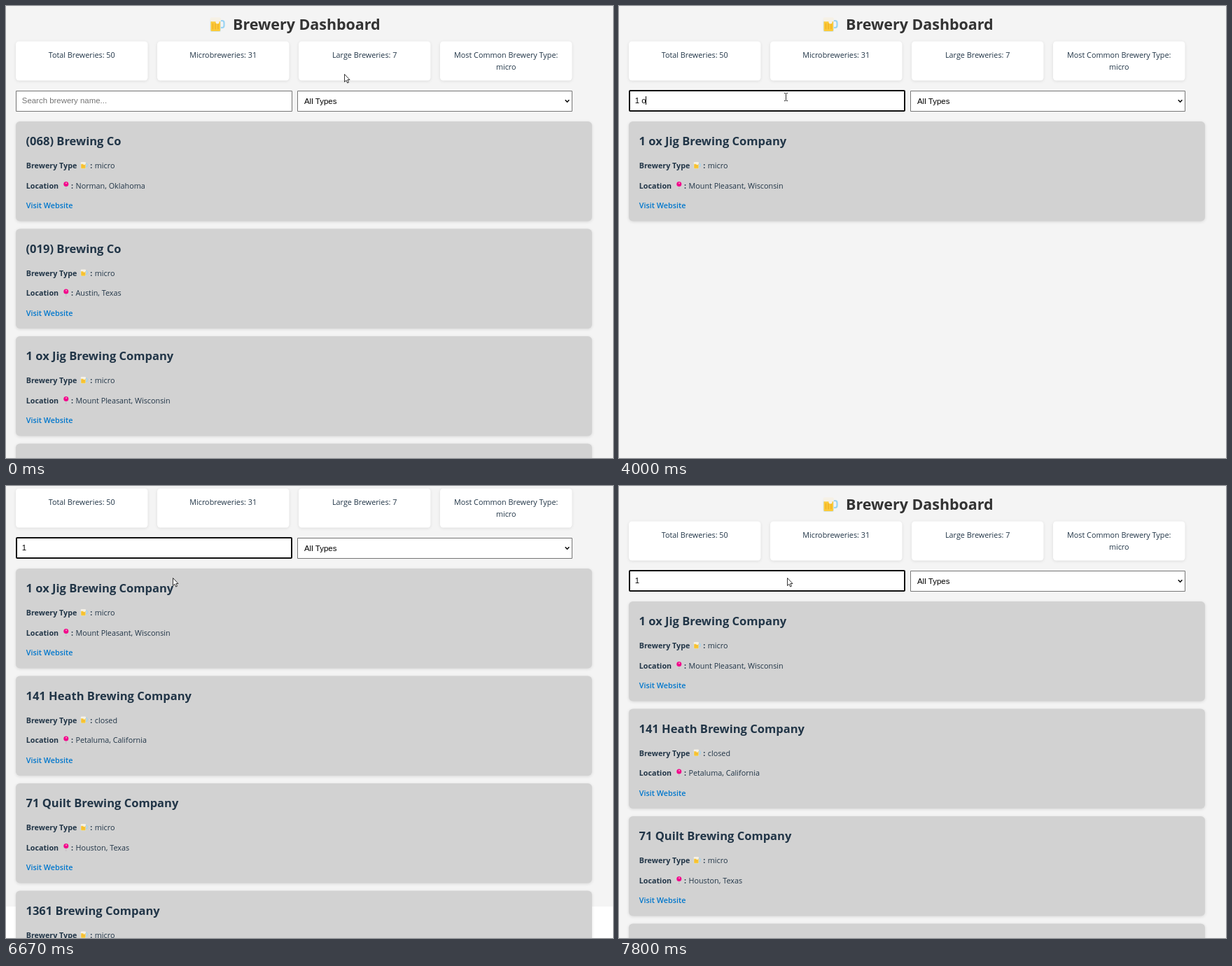
An HTML page with a canvas that plays this animation: 867x646 px, repeating every 8 s.

```html
<!DOCTYPE html>
<html lang="en">
<head>
<meta charset="utf-8">
<title>Brewery Dashboard</title>
<style>
html, body { margin: 0; width: 100%; height: 100%; overflow: hidden; background: #f4f4f4; }
canvas { display: block; }
</style>
</head>
<body>
<canvas id="stage" width="867" height="646"></canvas>
<script>
const ctx = document.getElementById('stage').getContext('2d');
const W = 867, H = 646, LOOP = 8000, TICK = 200 / 3;
const SANS = '"Open Sans", "Noto Sans", sans-serif';
const ARIAL = '11.43px "Liberation Sans", Arial, sans-serif';
const BODY = `10.8px ${SANS}`, BOLD = `bold 10.75px ${SANS}`;
const INK = '#213547';

const brewery = (name, type, place, site = true) => ({ name, type, place, site });
const breweries = [
  brewery('(068) Brewing Co', 'micro', 'Norman, Oklahoma'),
  brewery('(019) Brewing Co', 'micro', 'Austin, Texas'),
  brewery('1 ox Jig Brewing Company', 'micro', 'Mount Pleasant, Wisconsin'),
  brewery('10 Dapple Brewing Co', 'large', 'Bend, Oregon'),
  brewery('141 Heath Brewing Company', 'closed', 'Petaluma, California'),
  brewery('71 Quilt Brewing Company', 'micro', 'Houston, Texas'),
  brewery('1361 Brewing Company', 'micro', 'Spotsylvania, Virginia', false)
];

// Timelines are counted in ticks of 1/15 s.
const typing = [[0, ''], [54, '1'], [58, '1 '], [59, '1 o'], [62, '1 ox'], [70, '1 o'], [72, '1 ']];
const blinks = [16, 24, 32, 40, 48, 73, 76, 83, 92, 100, 107, 116];
const pointer = [
  [0, 483, 97], [5, 302, 101], [8, 302, 101], [9, 288, 98], [13, 156, 140], [18, 156, 140],
  [21, 239, 130], [93, 239, 130], [94, 240, 130], [99, 240, 130], [100, 238, 131],
  [106, 238, 131], [107, 240, 131]
];
const scrolling = [
  [97, 0], [98, 5], [99, 22], [100, 47], [101, 71], [102, 95], [103, 111], [104, 118],
  [111, 118], [112, 113], [114, 75], [115, 44], [116, 13], [117, 0]
];

function track(keys, n) {
  const i = keys.findIndex(k => k[0] > n);
  if (i === 0) return keys[0].slice(1);
  if (i < 0) return keys[keys.length - 1].slice(1);
  const a = keys[i - 1], b = keys[i], u = (n - a[0]) / (b[0] - a[0]);
  return a.slice(1).map((v, j) => Math.round(v + (b[j + 1] - v) * u));
}

const typedAt = n => typing.filter(k => k[0] <= n).pop()[1];

function text(str, x, y, font, color = INK, align = 'left') {
  ctx.font = font;
  ctx.fillStyle = color;
  ctx.textAlign = align;
  ctx.fillText(str, x, Math.round(y));
}

function panel(x, y, w, h, r, color, shadow) {
  ctx.save();
  ctx.shadowColor = `rgba(0,0,0,${shadow})`;
  ctx.shadowBlur = 4.5;
  ctx.shadowOffsetY = 1;
  block(x, y, w, h, r, color);
  ctx.restore();
}

function block(x, y, w, h, r, color) {
  ctx.fillStyle = color;
  ctx.beginPath();
  ctx.roundRect(x, y, w, h, r);
  ctx.fill();
}

function trace(points) {
  ctx.beginPath();
  points.forEach(([x, y]) => ctx.lineTo(x, y));
}

function stroke(color, width) {
  ctx.strokeStyle = color;
  ctx.lineWidth = width;
  ctx.stroke();
}

// Beer mug on a 22 x 22 grid.
function mug(x, y, scale) {
  ctx.save();
  ctx.translate(x, y);
  ctx.scale(scale, scale);
  ctx.beginPath();
  ctx.roundRect(14, 5.5, 6.5, 10, 3);
  stroke('#9ad4f3', 2.2);
  block(0.5, 3, 15.5, 18.5, 2, '#d3e6ee');
  block(1.5, 6, 13.5, 14.5, 1.5, '#fbcb3a');
  [3.5, 7.3, 11.1].forEach(bar => block(bar, 9, 1.8, 9, 0.9, '#f3b529'));
  block(0.5, 0.8, 15.5, 6, 2.5, '#f6f1e6');
  block(8.5, 4, 5, 6, 2.5, '#f6f1e6');
  ctx.restore();
}

function pin(x, y) {
  block(x - 0.5, y + 2, 1, 5.5, 0.5, '#bfbfc2');
  block(x - 3.5, y - 3.5, 7, 7, 3.5, '#f2078b');
  block(x - 0.8, y - 2.2, 2, 2, 1, '#ff9bd0');
}

function card(item, y) {
  panel(14, y, 823, item.site ? 142.5 : 125, 5.7, '#d2d2d2', 0.12);
  text(item.name, 28.5, y + 34, `bold 16.55px ${SANS}`);
  text('Brewery Type', 28.7, y + 67, BOLD);
  mug(106.5, y + 57.5, 0.47);
  text(':', 120.3, y + 67, BOLD);
  text(item.type, 126.8, y + 67, BODY);
  text('Location', 28.7, y + 95.5, BOLD);
  pin(85.8, y + 89.5);
  text(':', 93, y + 95.5, BOLD);
  text(item.place, 99.5, y + 95.5, BODY);
  if (item.site) text('Visit Website', 28.7, y + 124, `600 10.8px ${SANS}`, '#0077cc');
}

function header() {
  mug(291, 15.5, 1);
  text('Brewery Dashboard', 324, 34, `bold 21.45px ${SANS}`, '#333');
  const stats = ['Total Breweries: 50', 'Microbreweries: 31', 'Large Breweries: 7', 'Most Common Brewery Type:'];
  stats.forEach((label, i) => {
    const x = 14 + 202 * i;
    panel(x, 50.5, 188.5, 56, 4.5, '#fff', 0.1);
    text(label, x + 94.2, 74, BODY, INK, 'center');
  });
  text('micro', 714.2, 91, BODY, INK, 'center');
}

function frameBox(x, y, w, h, color, line) {
  ctx.fillStyle = '#fff';
  ctx.fillRect(x, y, w, h);
  ctx.beginPath();
  ctx.roundRect(x + line / 2, y + line / 2, w - line, h - line, line - 1);
  stroke(color, line);
}

function controls(n) {
  const typed = typedAt(n), focused = n >= 16;
  if (focused) frameBox(14, 120, 395, 31, '#101010', 2);
  else frameBox(14, 121, 395, 30, n >= 12 ? '#4f4f4f' : '#767676', 1);
  text(typed || 'Search brewery name...', 22.8, 139, ARIAL, typed ? '#000' : '#757575');
  if (blinks.filter(b => b <= n).length % 2) {
    ctx.fillStyle = '#000';
    ctx.fillRect(Math.floor(23 + ctx.measureText(typed).width), typed ? 129 : 130, 1, 12);
  }
  frameBox(416, 121, 393, 30, '#767676', 1);
  text('All Types', 426, 140, ARIAL, '#000');
  trace([[798.8, 134.3], [801.6, 137.2], [804.4, 134.3]]);
  stroke('#000', 1.5);
}

function arrow(x, y) {
  ctx.save();
  ctx.translate(x + 0.5, y + 0.5);
  trace([[0, 0], [0, 11], [2.5, 8.7], [4.2, 12.5], [6, 11.7], [4.3, 8], [7.5, 8]]);
  ctx.closePath();
  ctx.fillStyle = '#fff';
  ctx.fill();
  stroke('#222', 0.9);
  ctx.restore();
}

function beam(x, y) {
  ctx.fillStyle = '#333';
  ctx.fillRect(x - 1, y - 5, 1, 10);
  for (const edge of [y - 6, y + 5]) {
    ctx.fillRect(x - 3, edge, 2, 1);
    ctx.fillRect(x, edge, 2, 1);
  }
}

function draw(time) {
  const n = Math.floor((time % LOOP) / TICK + 1e-6);
  const [scroll] = track(scrolling, n);
  const [x, y] = track(pointer, n);
  const query = typedAt(Math.max(n - 1, 0));

  ctx.fillStyle = '#fff';
  ctx.fillRect(0, 0, W, H);
  ctx.save();
  ctx.translate(0, -scroll);
  ctx.fillStyle = '#f4f4f4';
  ctx.fillRect(0, 0, W, 648);
  header();
  controls(n);
  breweries.filter(b => b.name.includes(query)).slice(0, 4)
    .forEach((b, i) => card(b, 165 + 153.5 * i));
  ctx.restore();

  if (n >= 12 && n < 100) beam(x, y);
  else arrow(x, y);
}

const start = performance.now();
function loop() {
  draw(performance.now() - start);
  requestAnimationFrame(loop);
}
loop();
</script>
</body>
</html>
```
